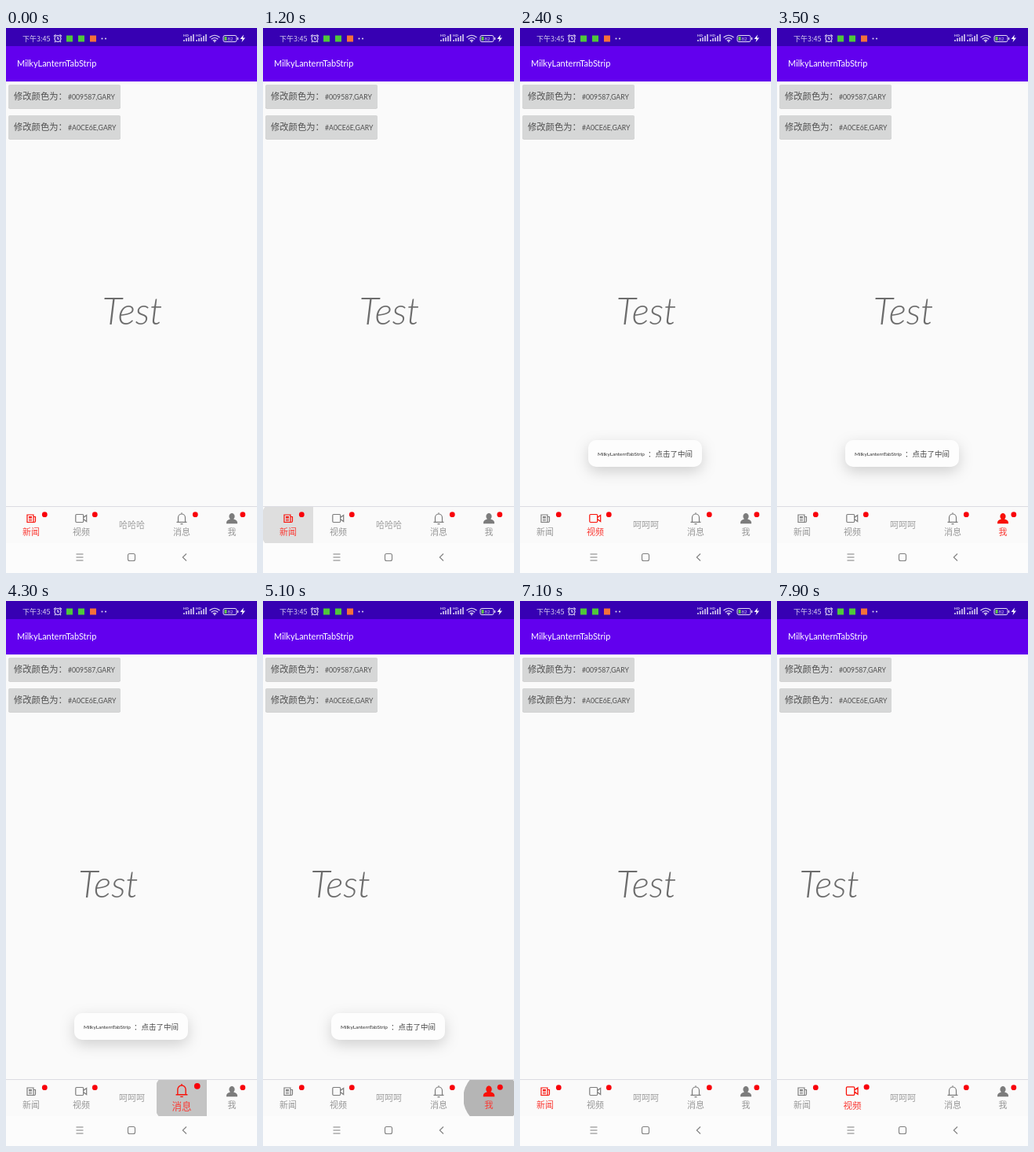
An HTML page that plays this animation: 320 by 693 pixels, repeating every 8000 ms.

```html
<!DOCTYPE html>
<html lang="zh-CN">
<head>
<meta charset="utf-8">
<title>Tab strip</title>
<style>
  html, body { margin: 0; width: 100%; height: 100%; overflow: hidden; background: #fafafa; }
  svg { display: block; width: 100vw; height: 100vh; }
  text { font-family: Lato, "Noto Sans CJK SC", "Noto Sans CJK", sans-serif; }
  .cjk { font-family: "Noto Sans CJK SC", "Noto Sans CJK", sans-serif; font-weight: 300; }
  .mid { text-anchor: middle; }
  .line { fill: none; stroke: currentColor; stroke-width: 1.2; }
  .tab { color: #7c7c7c; }
  .tab text { fill: #969696; font-size: 11px; }
  .tab.on { color: #f81008; }
  .tab.on text { fill: #fa3a34; }
  .page { font-size: 47px; font-style: italic; font-weight: 300; fill: #6c6c6c; }
  #toast { filter: drop-shadow(0 6px 9px rgba(0, 0, 0, .17)); }
</style>
</head>
<body>
<svg viewBox="0 0 320 693" preserveAspectRatio="none">
  <defs>
    <clipPath id="cell"><rect id="cellBox" y="609" width="64" height="46"/></clipPath>
    <g id="bars">
      <path d="M0 17v-2m3 2v-4m3 4v-5m3 5v-7m3 7v-9" stroke="#e4dcf6" stroke-width="1.5"/>
      <text x="-1" y="11" font-size="4.5" font-weight="700" fill="#e4dcf6">HD</text>
    </g>
  </defs>

  <rect width="320" height="693" fill="#fafafa"/>
  <g id="pages"></g>

  <rect width="320" height="23" fill="#3700b3"/>
  <rect y="23" width="320" height="45" fill="#6200ee"/>
  <text x="14" y="49" font-size="11" fill="#fff">MilkyLanternTabStrip</text>

  <g id="status" fill="#d6cdee" color="#e4dcf6">
    <text class="cjk" x="21" y="16.5" font-size="9">下午3:45</text>
    <g class="line">
      <circle cx="66" cy="13.5" r="4"/>
      <path d="M66 11v3h2M61 10.5l2.5-2M71 10.5l-2.5-2M63 17l-1 1M69 17l1 1"/>
    </g>
    <rect x="77" y="9.5" width="8" height="8" fill="#4fc83a"/>
    <rect x="92" y="9.5" width="8" height="8" fill="#4fc83a"/>
    <rect x="107" y="9.5" width="8" height="8" fill="#f5703a"/>
    <circle cx="122.5" cy="13.5" r="1.1"/><circle cx="127" cy="13.5" r="1.1"/>
    <use href="#bars" x="227"/><use href="#bars" x="243"/>
    <path class="line" d="M259.5 12q6.5-5.5 13 0M261.7 14.3q4.3-3.6 8.6 0M263.8 16.3q2.2-1.7 4.4 0"/>
    <circle cx="266" cy="17.3" r="1"/>
    <rect class="line" style="stroke-width:1" x="277" y="9.5" width="17" height="8" rx="2"/>
    <rect x="294.8" y="12" width="1.5" height="3"/>
    <rect x="278.5" y="11" width="3" height="5" fill="#62c94a"/>
    <text x="282.5" y="16" font-size="6">82</text>
    <path d="M303 8.500l-4.500 5.500h3l-1 4 4.500-5.500h-3z" fill="#fff"/>
  </g>

  <g id="buttons"></g>

  <rect y="608" width="320" height="47" fill="#fafafa"/>
  <path d="M0 608.5h320" stroke="#dcdce2"/>
  <circle id="ripple" cy="632" clip-path="url(#cell)"/>
  <g id="tabs">
    <g class="tab" data-index="0">
      <path class="line" d="M27 619h8v9.500h-8zM35 621.500h2.500v5.500q0 1.500-1.500 1.500h-2M29 624.500h4M29 626.500h4"/>
      <path d="M29 621h4v2h-4z" fill="currentColor"/>
    </g>
    <g class="tab" data-index="1">
      <path class="line" d="M90 618.500h7.500q1.200 0 1.200 1.200v7.600q0 1.200-1.200 1.200h-7.500q-1.200 0-1.200-1.200v-7.600q0-1.200 1.200-1.200zM98.700 622.500l4-3v8l-4-3"/>
    </g>
    <g class="tab" data-index="3">
      <path class="line" d="M217.500 628.300h13M219.500 628v-5.500a4.500 4.500 0 0 1 9 0v5.500M224 618v-1.800M222.500 630.600h3"/>
    </g>
    <g class="tab" data-index="4">
      <path d="M288 616.800a4 4.300 0 0 1 2.200 7.600q4.800 1 4.800 4.600v1.300h-14v-1.300q0-3.600 4.800-4.600a4 4.300 0 0 1 2.200-7.600z" fill="currentColor"/>
    </g>
  </g>
  <text id="middle" class="cjk mid" x="160.5" y="636" font-size="11" fill="#9e9e9e"></text>

  <g id="toast">
    <rect x="87" y="524" width="145" height="34" rx="10" fill="#fdfdfd"/>
    <text x="99" y="544" font-size="6.5" fill="#333">MilkyLanternTabStrip</text>
    <text class="cjk" x="163" y="544.5" font-size="9.5" fill="#444">：点击了中间</text>
  </g>

  <rect y="655" width="320" height="38" fill="#fcfcfc"/>
  <g class="line" color="#808080" style="stroke-width:1.1">
    <path d="M89.500 669h9M89.500 673h9M89.500 677h9M230 668.500l-4.700 4.500 4.700 4.500"/>
    <rect x="155.5" y="668.5" width="9" height="9" rx="2"/>
  </g>
</svg>

<script>
const LOOP = 8000, STEP = 100, WIDTH = 320, CELL = 64, SETTLE = 400, BOUNCE = 250;
const LABELS = ["新闻", "视频", "", "消息", "我"];
const TOAST = { start: 1750, end: 5400, fade: 200 };

// scroll start, tab, delay until the tab lights up
const MOVES = [[1980, 1, 0], [3000, 4, 0], [4150, 3, 0], [5083, 4, 0],
  [5750, 1, 0], [6279, 0, 60], [7873, 1, 0]];
// press time, tab
const TAPS = [[820, 0], [1880, 1], [2880, 4], [4030, 3], [4930, 4], [5630, 1]];

const $ = id => document.getElementById(id);
const clamp = v => Math.min(1, Math.max(0, v));
const easeOut = (u, power) => 1 - (1 - clamp(u)) ** power;

function add(parent, tag, attrs, content = "") {
  const node = document.createElementNS(parent.namespaceURI, tag);
  for (const key in attrs) node.setAttribute(key, attrs[key]);
  node.textContent = content;
  return parent.appendChild(node);
}

["#009587,GARY", "#A0CE6E,GARY"].forEach((code, i) => {
  const y = 72 + i * 39, box = { x: 3, width: 143, height: 30, rx: 2 };
  add($("buttons"), "rect", { ...box, y: y + 0.7, fill: "#c6c6c6" });
  add($("buttons"), "rect", { ...box, y, fill: "#d6d7d7" });
  add($("buttons"), "text", { class: "cjk", x: 10, y: y + 19, "font-size": 11.3, fill: "#505050" }, "修改颜色为：");
  add($("buttons"), "text", { x: 79, y: y + 18.5, "font-size": 8.7, fill: "#505050" }, code);
});

const pages = LABELS.map(() => add($("pages"), "text", { class: "page mid", y: 377 }, "Test"));

const tabs = [...document.querySelectorAll(".tab")].map(node => {
  const index = +node.dataset.index, x = CELL * (index + 0.5);
  add(node, "text", { class: "cjk mid", x, y: 645 }, LABELS[index]);
  add(node, "circle", { cx: index === 4 ? 301.8 : x + 17.3, cy: 618.7, r: 3.4, fill: "#f8000a" });
  return { node, index, x };
});

function scrollAt(t) {
  return MOVES.reduce((pos, [at, tab]) =>
    pos + (tab - pos) * easeOut((t - at) / SETTLE, 5), 0);
}

function drawTabs(t) {
  let selected = 0, since = -BOUNCE;
  for (const [at, tab, delay] of MOVES) {
    if (t >= at + delay) [selected, since] = [tab, at + delay];
  }
  const grow = 1 + 0.15 * Math.sin(Math.PI * clamp((t - since) / BOUNCE));
  for (const { node, index, x } of tabs) {
    const on = index === selected;
    node.classList.toggle("on", on);
    node.setAttribute("transform",
      on ? `translate(${x} 632) scale(${grow}) translate(${-x} -632)` : "");
  }
}

function drawRipple(t) {
  const [at, tab] = TAPS.findLast(([start]) => t >= start) || [-LOOP, 0];
  const age = t - at, ripple = $("ripple");
  $("cellBox").setAttribute("x", tab * CELL);
  ripple.setAttribute("cx", (tab + 0.55) * CELL);
  ripple.setAttribute("r", 40 * easeOut(age / 250, 2));
  ripple.setAttribute("opacity", 0.28 * clamp((500 - age) / 300));
}

function draw(t) {
  const scroll = scrollAt(t);
  pages.forEach((page, i) => page.setAttribute("x", WIDTH / 2 + 1 + WIDTH * (i - scroll)));
  drawTabs(t);
  drawRipple(t);
  $("middle").textContent = t < TOAST.start ? "哈哈哈" : "呵呵呵";
  $("toast").setAttribute("opacity",
    clamp((t - TOAST.start) / TOAST.fade) * clamp((TOAST.end + TOAST.fade - t) / TOAST.fade));
}

const begin = performance.now();
function tick() {
  const t = (performance.now() - begin) % LOOP;
  draw(Math.floor(t / STEP) * STEP);
  requestAnimationFrame(tick);
}
tick();
</script>
</body>
</html>
```
